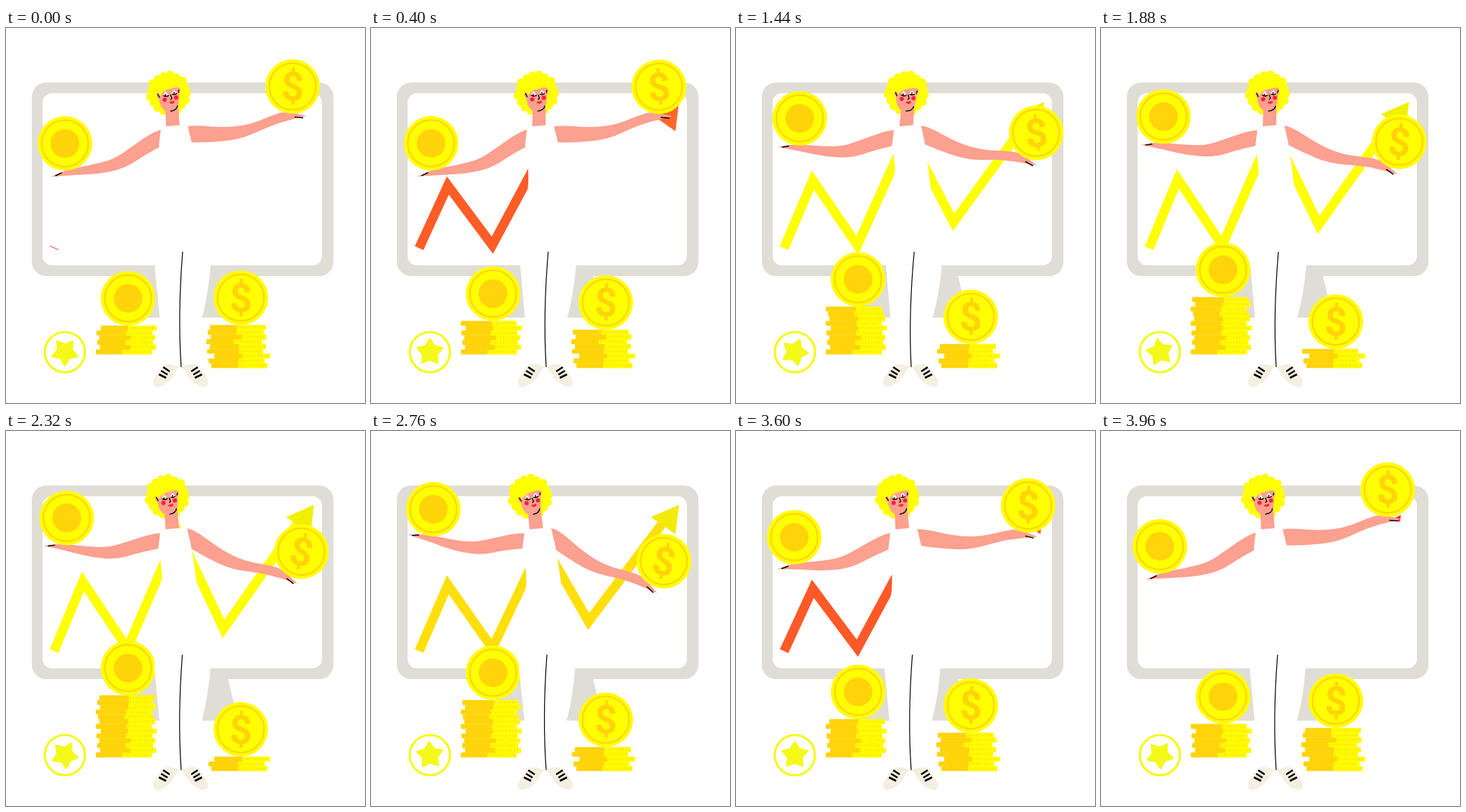
Animation of 500 by 523 pixels, one loop 4 s. Source, as an HTML page with a canvas:

```html
<!DOCTYPE html>
<html lang="en">
<head>
<meta charset="utf-8">
<title>Coins in balance</title>
<style>
  html, body { margin: 0; width: 100%; height: 100%; overflow: hidden; background: #fff; }
  canvas { display: block; }
</style>
</head>
<body>
<canvas id="stage" width="500" height="523"></canvas>
<script>
const ctx = document.getElementById('stage').getContext('2d');
const LOOP = 4000, TAU = Math.PI * 2, RAD = Math.PI / 180;
const YELLOW = '#ffff00', GOLD = '#ffd40a', SKIN = '#fca08f', GREY = '#e0ddd6', INK = '#000', RED = '#ff2038';
const LAYER = 6.65;

// Looping curve through keys, without overshoot.
const KEY_TIMES = [0, 800, 1440, 2320, 2760, 3240];
function track(values) {
  const n = values.length;
  const time = i => KEY_TIMES[(i + n) % n] + LOOP * Math.floor(i / n);
  const value = i => values[(i + n) % n];
  const slope = i => (value(i + 1) - value(i)) / (time(i + 1) - time(i));
  const tangent = i => {
    const a = slope(i - 1), b = slope(i);
    return a * b > 0 ? 2 * a * b / (a + b) : 0;
  };
  return t => {
    let i = n - 1;
    while (time(i) > t) i--;
    const span = time(i + 1) - time(i), u = (t - time(i)) / span, v = 1 - u;
    return value(i) * v * v * (1 + 2 * u) + value(i + 1) * u * u * (3 - 2 * u)
      + span * u * v * (tangent(i) * v - tangent((i + 1) % n) * u);
  };
}
const sway = track([0, 3.3, 4.5, -0.8, -2, -1.2]);
const leftAngle = track([20, 19.7, 4.9, 2.8, -2.7, 6.3]);
const rightAngle = track([-8.7, -8, 15.5, 23.5, 28.4, 13]);
const dollarTilt = track([0, -11, -6, 12, 12, 0]);
const chartStretch = track([0, 0.1, 0.78, 1, 0.55, 0]);

const clamp = x => Math.max(0, Math.min(1, x));

function fill(color, path) {
  ctx.fillStyle = color;
  ctx.fill(typeof path === 'string' ? new Path2D(path) : path);
}
function stroke(color, width, path) {
  ctx.strokeStyle = color;
  ctx.lineWidth = width;
  ctx.stroke(new Path2D(path));
}
function disc(x, y, r, color) {
  ctx.beginPath();
  ctx.arc(x, y, r, 0, TAU);
  ctx.fillStyle = color;
  ctx.fill();
}
function ring(x, y, r, width, color) {
  ctx.beginPath();
  ctx.arc(x, y, r, 0, TAU);
  ctx.strokeStyle = color;
  ctx.lineWidth = width;
  ctx.stroke();
}
function roundRect(x, y, w, h, r, color) {
  const path = new Path2D();
  path.roundRect(x, y, w, h, r);
  fill(color, path);
}
function group(draw) {
  ctx.save();
  draw();
  ctx.restore();
}

function softShape(points) {
  const path = new Path2D(), n = points.length;
  points.forEach(([x, y], i) => {
    const [nx, ny] = points[(i + 1) % n];
    const mx = (x + nx) / 2, my = (y + ny) / 2;
    if (i) path.quadraticCurveTo(x, y, mx, my);
    else path.moveTo(mx, my);
  });
  const [x, y] = points[0], [nx, ny] = points[1];
  path.quadraticCurveTo(x, y, (x + nx) / 2, (y + ny) / 2);
  return path;
}
const LEFT_ARM = softShape([[-12, -10], [12, -9], [45, 0], [72, 7], [103, 4], [138, -2], [162, 0], [162, 0],
  [130, 9], [95, 20], [60, 24], [28, 16], [-12, 10]]);
const RIGHT_ARM = softShape([[-12, -10], [8, -11], [50, -1], [85, 0], [118, -8], [137, -11], [165, 0], [165, 0],
  [132, 3], [110, 7], [72, 18], [35, 17], [-12, 11]]);

function coin(x, y, dollar, tilt = 0) {
  group(() => {
    ctx.translate(x, y);
    ctx.rotate(tilt * RAD);
    disc(0, 0, 38, YELLOW);
    ring(0, 0, 32.5, 2.2, GOLD);
    if (!dollar) return disc(0, 0, 20, GOLD);
    ctx.font = '700 55px Roboto, sans-serif';
    ctx.textAlign = 'center';
    ctx.fillStyle = GOLD;
    ctx.fillText('$', 0, 19.5);
  });
}

function stack(x, base, count, offsets) {
  for (let i = 0; i < count; i++) {
    const left = x + offsets[i % offsets.length], top = base - (i + 1) * LAYER;
    const split = left + 37 + (i * 5) % 8;
    roundRect(left, top, 78, LAYER + 0.3, 1.5, GOLD);
    roundRect(split, top, left + 78 - split, LAYER + 0.3, 1.5, YELLOW);
    ctx.setLineDash([1, 3]);
    stroke(GOLD, 3, `M${split + 2} ${top + 3.4}H${left + 76}`);
    ctx.setLineDash([]);
  }
}

function stacks(t) {
  const left = 6 + Math.min(Math.floor(t / 300), Math.ceil((LOOP - t) / 245));
  const right = t < 2100 ? Math.max(3, 9 - Math.floor(t / 320)) : 3 + Math.floor((t - 2100) / 300);
  stack(125, 455, left, [0, 6, 2, 5, 1, 7, 0, 5, 3]);
  stack(280, 474, right, [6, 2, 10, 0, 4, -1, 5, 1, 4]);
  coin(170, 417 - left * LAYER, false);
  coin(327, 436 - right * LAYER, true);
}

function monitor() {
  fill(GREY, 'M182 345H309L323 404H168Z');
  roundRect(36, 76, 420, 270, 20, GREY);
  roundRect(51, 91, 389, 240, 13, '#fff');
}

function chart(t) {
  const k = chartStretch(t);
  const g = Math.min(255, 25 + 0.168 * t, 25 + 0.16 * (LOOP - t));
  const b = Math.min(40, (255 - g) * 0.3);
  const points = [[67, 307], [107, 220 - 10 * k], [169, 303], [239, 173 - 33 * k], [303, 253 + 23 * k], [408, 126]];
  const length = points.slice(1).reduce((sum, [x, y], i) => sum + Math.hypot(x - points[i][0], y - points[i][1]), 0);
  const drawn = clamp(Math.min(t / 750, (LOOP - 60 - t) / 650));
  if (drawn > 0) group(() => {
    ctx.setLineDash([length * drawn, length * 2]);
    stroke(`rgb(255,${g},${b})`, 13, 'M' + points.join('L'));
  });
  const size = clamp(Math.min(t, LOOP - t) / 160);
  group(() => {
    ctx.translate(414, 122);
    ctx.scale(size, size);
    fill(`rgb(${g > 200 ? 242 : 255},${Math.min(240, g + 12)},${b})`, 'M15-19L-24-2L10 22Z');
  });
}

function head(s) {
  group(() => {
    ctx.translate(232, 137);
    ctx.rotate(s * 1.6 * RAD);
    ctx.translate(-232, -137);
    disc(226.5, 91, 27, YELLOW);
    for (let i = 0; i < 17; i++) {
      const a = i / 17 * TAU, r = 25.5 + Math.sin(i * 2.6);
      disc(226.5 + r * Math.cos(a), 91 + r * Math.sin(a), 5.5, YELLOW);
    }
    fill(SKIN, 'M222 112L240 109L242 138H223Z');
    fill(SKIN, 'M210 91Q213 89 215 95Q219 86 229 85Q236 82 241 83Q244 87 241 93Q242 108 237 114Q230 119 221 115Q214 110 213 99Q209 96 210 91Z');
    fill('#fff', 'M219 94L222 88L226 93ZM230 92L234 86L238 91Z');
    stroke(INK, 1.3, 'M219 94Q223 97 227 94M231 92Q235 94 238 91M222 95V92M234 92V89M229 93L231 98L229 100M211 92L214 97M241 86L240 90');
    disc(221, 100, 2.9, RED);
    disc(237, 97, 2.9, RED);
    fill(RED, 'M227 104L230 102L231 103L233 101L235 103Q232 108 227 104Z');
    stroke(INK, 1.4, 'M229 116Q238 115 239 108');
  });
}

function arm(side, x, y, angle, shape, tilt) {
  group(() => {
    ctx.translate(x, y);
    ctx.scale(side, 1);
    ctx.rotate(angle * RAD);
    fill(SKIN, shape);
    stroke(INK, 1.5, side < 0 ? 'M146 0L156 1' : 'M148-1L160 2');
  });
  const [u, v] = side < 0 ? [128, -37] : [152, -43.5];
  const c = Math.cos(angle * RAD), d = Math.sin(angle * RAD);
  coin(x + side * (u * c - v * d), y + u * d + v * c, side > 0, tilt);
}

function shoes() {
  for (const side of [-1, 1]) group(() => {
    ctx.translate(243, 0);
    ctx.scale(side, 1);
    fill('#f5efe2', 'M2 472Q12 468 21 469Q32 479 38 491Q40 502 30 500.500Q20 498 11 487Z');
    stroke(INK, 2.6, 'M15 479L24 473M18 483.500L27 478M20 488L30 483');
  });
}

function star(t) {
  ring(82, 452, 28, 3.2, '#f4f91a');
  const path = new Path2D();
  for (let i = 0; i < 10; i++) {
    const a = i * TAU / 10 - TAU / 4, r = i % 2 ? 10.5 : 18.5;
    path.lineTo(r * Math.cos(a), r * Math.sin(a));
  }
  path.closePath();
  group(() => {
    ctx.translate(82, 452);
    ctx.rotate((36 + 360 * t / LOOP) * RAD);
    ctx.lineJoin = 'round';
    fill('#f4f91a', path);
    ctx.strokeStyle = '#f4f91a';
    ctx.lineWidth = 2.5;
    ctx.stroke(path);
  });
}

function woman(t) {
  const s = sway(t);
  // The body leans from the feet.
  const lean = draw => group(() => {
    ctx.transform(1, 0, -s / 328, 1, s * 473 / 328, 0);
    draw();
  });
  lean(() => head(s));
  arm(-1, 215 + s, 152, leftAngle(t), LEFT_ARM, 0);
  arm(1, 255.5 + s, 147.5, rightAngle(t), RIGHT_ARM, dollarTilt(t));
  lean(() => {
    fill('#fff', 'M216 138L224 137L242 135.500L253 136L258 157L264 195Q268 230 276 270Q283 300 285 331Q282 370 273 404L262 471L244 473L228 471L214 404L207 331Q209 270 217 225Q220 200 213 163Z');
    stroke(INK, 1.2, 'M246 312Q239 400 244 473');
  });
  shoes();
}

function frame(now) {
  const t = now % LOOP;
  ctx.fillStyle = '#fff';
  ctx.fillRect(0, 0, 500, 523);
  monitor();
  chart(t);
  stacks(t);
  star(t);
  woman(t);
  requestAnimationFrame(frame);
}
frame(0);
</script>
</body>
</html>
```
